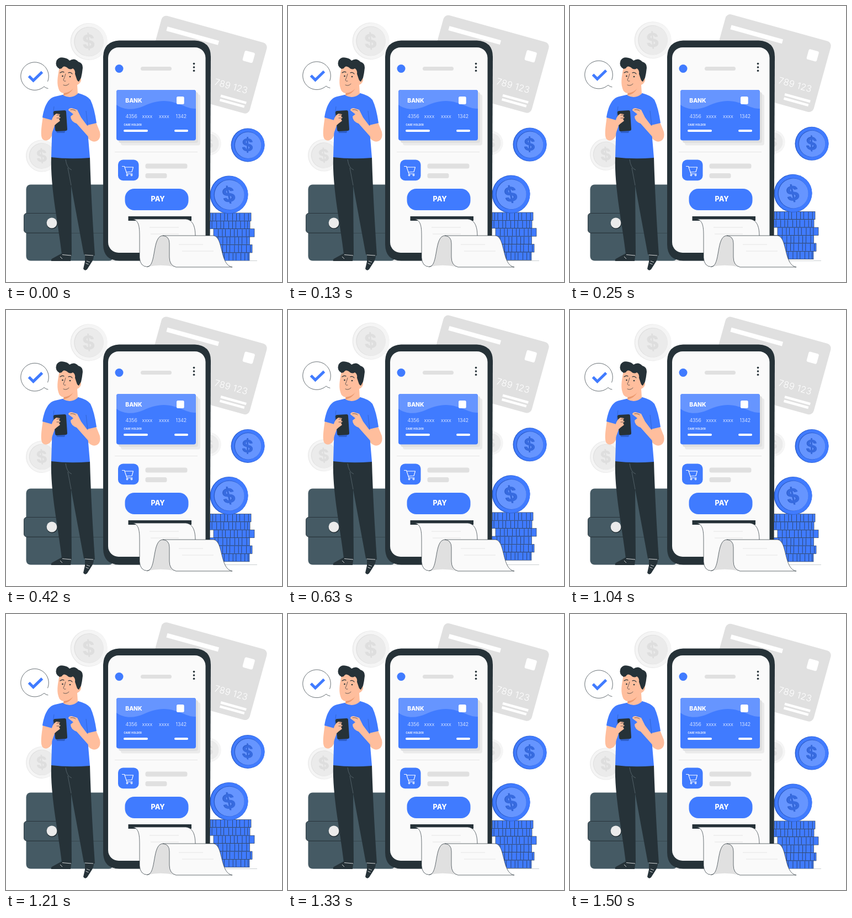
An HTML page for the animation above (1540 ms loop, 500 by 500 pixels).

```html
<!DOCTYPE html>
<html lang="en">
<head>
<meta charset="utf-8">
<title>Mobile payment</title>
<style>
  html, body { margin: 0; width: 100%; height: 100%; overflow: hidden; background: #fff; }
  svg { display: block; width: 100vw; height: 100vh; }
  text { font-family: Inter, "Open Sans", sans-serif; }
  .blue { fill: #407bff; }
  .dark { fill: #263238; }
  .skin { fill: #ffbe9d; }
  .grey { fill: #e0e0e0; }
  .white { fill: #fff; }
  .line { fill: none; stroke: #263238; stroke-width: .7; stroke-linecap: round; stroke-linejoin: round; }
  .paper { fill: #fafafa; stroke: #263238; stroke-width: .7; stroke-linejoin: round; }
  .rule { fill: none; stroke: #e0e0e0; stroke-width: .8; }
</style>
</head>
<body>
<svg viewBox="0 0 500 500">
  <g class="float">
    <g transform="translate(284 15.7) rotate(15.5)">
      <rect class="grey" width="198" height="133" rx="9"/>
      <rect class="white" x="14" y="18.500" width="97" height="8"/>
      <rect class="white" x="161" y="22.500" width="19" height="19" rx="3"/>
      <text class="white" x="123" y="97.500" font-size="16.300" font-weight="300" letter-spacing=".4">789 123</text>
      <rect class="white" x="140.500" y="111.500" width="48" height="4.500"/>
      <rect class="white" x="141" y="119" width="46" height="4.500"/>
    </g>
    <g id="coins"></g>
    <g id="stack"></g>
    <g id="topCoin"></g>
    <path class="white" d="M77.500 128A25.500 25.500 0 1 0 69 146.500L76 150Z"/>
    <path class="line" d="M75.600 136.500A25.300 25.300 0 1 0 69 146Q72 149 76 149.500"/>
    <path d="M41.500 127l8 8L65.500 119.500" fill="none" stroke="#407bff" stroke-width="5"/>
  </g>

  <path d="M160 461.500H455" stroke="#b5babd" stroke-width=".7"/>

  <g id="wallet">
    <rect x="36.500" y="323.500" width="158" height="138" rx="8" fill="#455a64"/>
    <path d="M37 411.500H185" stroke="#37474f" stroke-width="1.200"/>
    <rect x="32.500" y="375.500" width="70" height="35.500" rx="5" fill="#455a64" stroke="#263238" stroke-width=".9"/>
    <circle class="dark" cx="83.500" cy="394.300" r="10"/>
    <circle cx="83" cy="393" r="9.400" fill="#ebebeb"/>
  </g>

  <g id="phone">
    <path class="dark" d="M205 62.500H342Q371 64 371 92L369.500 433Q369 461 341 461.500H205Q176.500 461 176 432V92Q177 64 205 62.500Z"/>
    <rect x="185" y="75" width="176.500" height="372" rx="19" fill="#fafafa"/>
    <circle class="blue" cx="205" cy="113.500" r="7.500"/>
    <rect class="grey" x="244" y="110" width="56" height="7" rx="3.500"/>
    <g class="dark"><circle cx="340.500" cy="104.500" r="1.800"/><circle cx="340.500" cy="111" r="1.800"/><circle cx="340.500" cy="117.200" r="1.800"/></g>

    <rect x="208" y="160" width="144" height="92.500" rx="4" fill="#ebebeb"/>
    <rect x="204" y="156" width="144" height="92" rx="4" class="grey"/>
    <rect class="blue" x="200" y="152" width="144" height="91.500" rx="4"/>
    <path d="M200 179C214 189 232 189 250 181S285 169 305 175S330 186 344 186V156a4 4 0 0 0-4-4H204a4 4 0 0 0-4 4Z" fill="#6695ff"/>
    <rect class="white" x="309" y="164" width="13.700" height="14" rx="2.500"/>
    <g class="white">
      <text x="216.300" y="174.500" font-size="10.300" font-weight="800">BANK</text>
      <g font-size="8.800" font-weight="300">
        <text x="216.500" y="202.500">4356</text><text x="246.500" y="202.500">xxxx</text>
        <text x="277" y="202.500">xxxx</text><text x="307.500" y="202.500">1342</text>
      </g>
      <text x="213.500" y="217" font-size="4.200" font-weight="700" letter-spacing=".28">CARE HOLDER</text>
      <rect x="213" y="224" width="44" height="4" rx="2"/>
      <rect x="305" y="224" width="25" height="4" rx="2"/>
    </g>
    <path class="rule" d="M197 264.500H347"/>

    <rect class="blue" x="203" y="278.500" width="37.500" height="37.700" rx="9"/>
    <g fill="none" stroke="#fff" stroke-width="1.100" stroke-linecap="round" stroke-linejoin="round">
      <path d="M210.500 290.500h4l4.500 13.500h10M215 292h15.500l-2.500 8.500-10 .5"/>
      <circle cx="219.500" cy="306.300" r="1.300"/><circle cx="227.500" cy="306.300" r="1.300"/>
    </g>
    <rect class="grey" x="252.500" y="285.500" width="76" height="9" rx="3.500"/>
    <rect class="grey" x="252.500" y="303" width="39" height="9" rx="3.500"/>
    <rect class="blue" x="215.500" y="331" width="115" height="39" rx="17"/>
    <text class="white" x="275.200" y="354.200" font-size="12.600" font-weight="800" text-anchor="middle">PAY</text>
    <rect class="dark" x="221.500" y="381" width="114.500" height="8"/>
  </g>

  <g id="receipt">
    <path class="paper" d="M229 386H326C340 388 343 402 343 418V440L256 472.500Q243 472 242 456V418C242 400 241 388 229 386Z"/>
    <path d="M256 472.500C273 472 264 416 284 416Q296 416 296 432V456L308 473Q280 467 256 472.500Z" class="grey"/>
    <path class="paper" d="M284 416H376C394 418 387 470 410 473H308Q296 470 296 455V430Q296 417 284 416Z"/>
    <path class="line" d="M256 472.500C273 472 264 416 284 416"/>
    <path class="rule" d="M260 401H313M262 413H313M313 432H357M319 444H376"/>
  </g>

  <g id="man">
    <path class="dark" d="M103 447L83 458Q81 460 82 462H117L119 447ZM143 447L159 449Q160 458 154 466L147 477Q143 481 140 476L143 463Z"/>
    <path class="dark" d="M82 273L152 274C153.500 330 157 390 161 452L141 450L118 325L119 452L101 450C95 395 80 330 82 273Z"/>
    <path d="M118 325L112 293M108 278Q110 294 119 297" fill="none" stroke="#65747b" stroke-width=".7"/>
    <path d="M102 450.500l16 1.500M143 451l15 1M98 454l4 4M146 462l6 2M144.500 466l5 2" fill="none" stroke="#fff" stroke-width=".8"/>
    <path class="skin" d="M67 200C64 220 62 235 66 241Q72 247 80 240L98 212 92 196 83 218 86 205ZM143 213L150 222 131 198 117 190 119 205 148 239Q158 250 167 243Q172 238 170 228L162 208Z"/>
    <path class="blue" d="M102 161L131 158Q147 162 153 170Q160 184 164 212L147 216L152 275Q115 278 82 274L84 207L66 202C69 184 75 167 89 164Z"/>
    <path d="M87 182L84 207M145 190L148 217" fill="none" stroke="#2f60cc" stroke-width=".8"/>
    <path d="M90 223L108 225 106 230H92Z" fill="#2f60cc"/>
    <path class="skin" d="M148 218L163 212.500 169 234Q163 247 152 240L128 213Q117 209 117 200L122 196L113 189Q113 185 119 185L129 188 136 202ZM70 236L82 212 88 217 80 239Z"/>
    <path class="dark" d="M89 190L106 189Q109 189 109 192L111 223Q111 226 108 226L92 227Q89 227 89 224L86 193Q86 190 89 190Z"/>
    <path class="skin" d="M82 212Q83 200 91 195L98 196 96 200 99 202 96 205 98 208Q91 213 86 218Z"/>
    <path class="line" d="M117 188q6-1 9 2M92 198l5-1M92 203h6"/>

    <path class="skin" d="M97 110C95 122 91 137 95 149Q97 157 104 158L104 162Q118 169 130 159L129 143Q137 139 136 132Q134 127 130 130L128 108Z"/>
    <path d="M105 158Q117 156 122 149Q116 160 104 162Z" fill="#eb996e"/>
    <path class="dark" d="M97 114Q88 109 91.500 99Q96 91 106 94Q112 95 115 99Q124 93 131 101Q139 103 139 112Q138 122 136 130L132 137Q129 136 128 132L125 123Q126 116 121 113Q116 117 110 111Q104 107 101 113Z"/>
    <path class="line" d="M108 123Q106 130 104 134Q105 137 108 136M104 143Q109 146 114 141"/>
    <path class="line" d="M98 121q4-3 7-1M113 121q4-2 7 2" style="stroke-width:1.200"/>
    <circle class="dark" cx="102.500" cy="127" r="1.300"/><circle class="dark" cx="116" cy="128" r="1.300"/>
  </g>
</svg>
<script>
const LOOP = 1540, LIFT = 8.5, LEAD = 42;
const byId = id => document.getElementById(id);
const blues = { edge: '#2f62d2', rim: '#407bff', face: '#6695ff', shade: '#2f5fcb', sign: '#376be0' };
const greys = { edge: '#ebebeb', rim: '#f5f5f5', face: '#ebebeb', shade: '#e0e0e0', sign: '#dedede' };

function coin(x, y, r, tint, tilt) {
  const sign = (dx, dy, fill) =>
    `<text x="${dx}" y="${dy}" font-size="31" font-weight="700" text-anchor="middle" fill="${fill}">$</text>`;
  return `<g transform="translate(${x} ${y}) rotate(${tilt}) scale(${r / 30})">
    <circle r="30" fill="${tint.edge}"/>
    <circle cx=".8" r="29.200" fill="${tint.rim}"/>
    <circle r="24" fill="${tint.shade}"/>
    <circle cx=".6" cy=".3" r="23.400" fill="${tint.face}"/>
    ${sign(-1, 10.9, tint.shade)}${sign(0, 11.2, tint.sign)}
  </g>`;
}

byId('coins').innerHTML =
  coin(150, 64.5, 33.5, greys, -4) + coin(65, 271.5, 29, greys, -4) +
  coin(368, 249, 21.5, greys, -4) + coin(438, 252, 30.5, blues, 0);
byId('topCoin').innerHTML = coin(404, 342, 34.5, blues, -12);

byId('stack').innerHTML = [444, 442, 450, 441.5, 446, 441].map((right, i) => {
  const y = 375 + i * 14.4, x = right - 74;
  return `<rect x="${x}" y="${y}" width="74" height="14.400" class="blue" stroke="#263238" stroke-width=".6"/>
    <path d="M${x + 4} ${y + 7.2}h68" stroke="#263238" stroke-width="13"
      stroke-dasharray=".7 5 .7 8 .7 6.500" stroke-dashoffset="${i * 5}"/>`;
}).join('');

const float = document.querySelector('.float');
const start = performance.now();
function draw(time) {
  const phase = 2 * Math.PI * (time % LOOP + LEAD) / LOOP;
  const y = -LIFT * (1 - Math.cos(phase)) / 2;
  float.setAttribute('transform', `translate(0 ${y.toFixed(2)})`);
}
function tick() {
  draw(performance.now() - start);
  requestAnimationFrame(tick);
}
tick();
</script>
</body>
</html>
```
